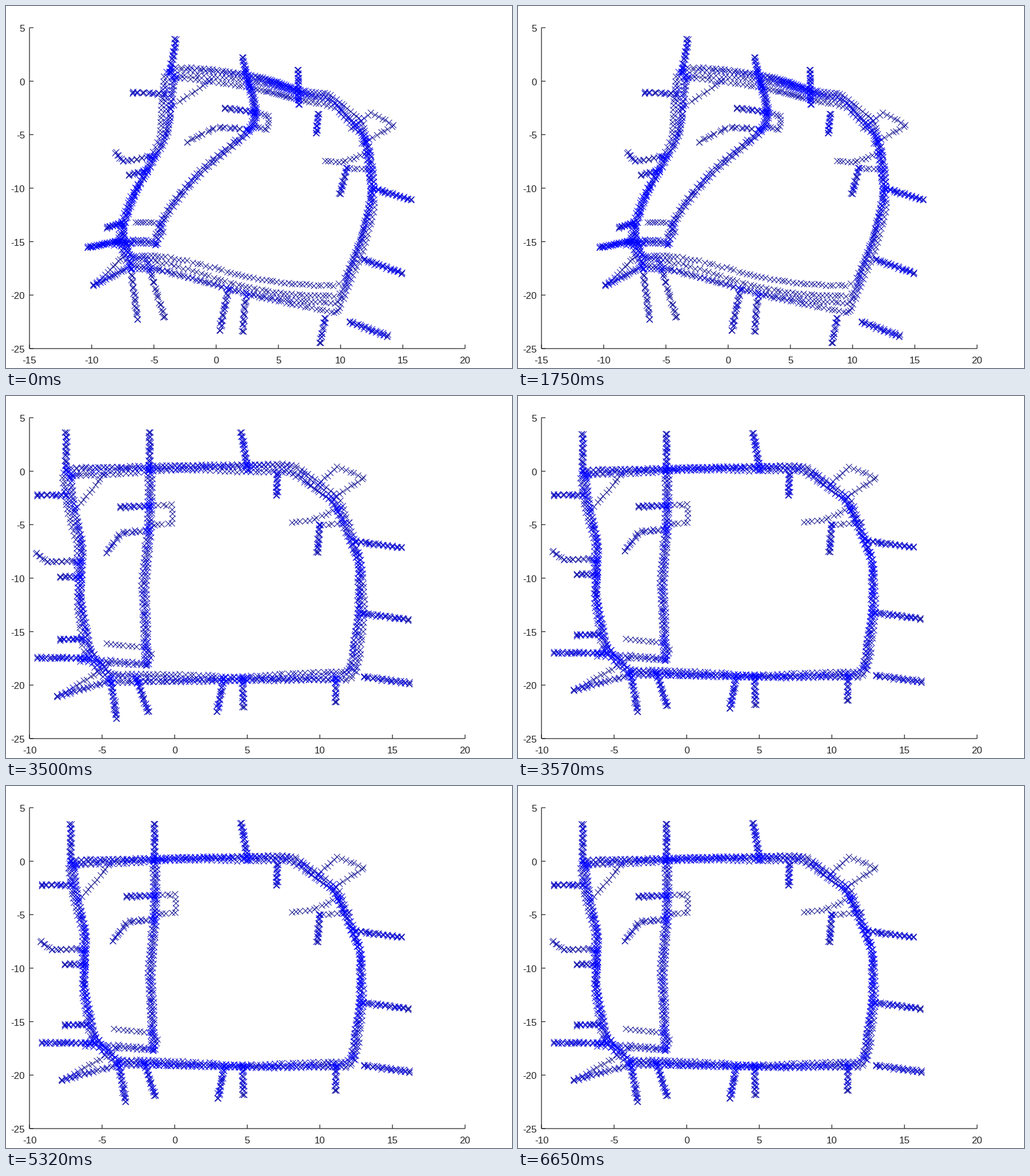
A matplotlib script that plays this animation: 884x634 px, repeating every 6.72 s.

```python
import numpy as np
import matplotlib.pyplot as plt
from matplotlib.animation import FuncAnimation

W, H, DPI = 884, 634, 100
LEFT, RIGHT, TOP, BOTTOM = 41, 802, 38, 600
FRAMES, INTERVAL, HOLD = 96, 70, 25
PX = 72 / DPI
INK = "#262626"
LAPS, STEP = 4, 7.8


def resample(path, step):
    p = np.array(path, float).reshape(-1, 2)
    d = np.r_[0, np.cumsum(np.hypot(*np.diff(p, axis=0).T))]
    s = np.linspace(0, d[-1], max(3, round(d[-1] / step) + 1))
    return np.c_[np.interp(s, d, p[:, 0]), np.interp(s, d, p[:, 1])]


def rounded(path, radius):
    """Close a path and soften its corners."""
    p = resample(path + path[:2], 1)
    k = np.ones(2 * radius + 1) / (2 * radius + 1)
    wrap = np.pad(p, ((radius, radius), (0, 0)), mode="wrap")
    return np.c_[np.convolve(wrap[:, 0], k, "valid"),
                 np.convolve(wrap[:, 1], k, "valid")]


class Survey:
    """Poses of a robot walking a floor plan, in stage pixels."""

    def __init__(self, spread):
        self.rng = np.random.default_rng(7)
        self.spread = spread
        self.rows = []

    def walk(self, path, n=1, w=0.0, lap=0.0, turns=0.0):
        """Follow a path n times on lanes that weave over +-w pixels."""
        for k in range(n):
            p = resample(path, STEP)
            t = np.gradient(p, axis=0)
            t /= np.maximum(np.hypot(*t.T), 1e-6)[:, None]
            m = len(p)
            lane = w * np.cos(np.pi * k / max(n - 1, 1) + turns * np.linspace(0, 6.28, m))
            side = lane + self.rng.normal(0, 0.6, m)
            along = self.rng.uniform(-2, 2, m)
            along[[0, -1]] = 0
            q = p + t * along[:, None] + np.c_[-t[:, 1], t[:, 0]] * side[:, None]
            self.rows.append(np.c_[q, np.full(m, lap * k / max(n - 1, 1))])

    def spur(self, x, y, dx, dy):
        """A dead end, walked in and out."""
        self.walk([x, y, x + dx, y + dy], 3, 1.3)

    def building(self):
        wall = [105, 133, 300, 129, 500, 126, 578, 182, 622, 290, 622, 380, 605, 490,
                400, 492, 180, 495, 142, 450, 125, 360, 128, 260, 114, 200]
        self.walk(rounded(wall, 14), LAPS, self.spread, lap=1, turns=2)
        self.walk([252, 130, 251, 225, 241, 330, 246, 470], 3, 4)
        self.walk([170, 138, 150, 165, 120, 200])

        for x, lean in (105, 0), (251, 0), (423, -12):
            self.spur(x, 130, lean, -66)
        for x, lean, drop in (183, 10, 70), (228, 20, 58), (380, -11, 58), (414, 1, 50), (576, 0, 41):
            self.spur(x, 495, lean, drop)
        for x, y, reach in (105, 174, 50), (130, 317, 35), (132, 426, 37), (145, 459, 90):
            self.spur(x, y, -reach, 0)
        for x, y in (612, 255), (624, 381), (626, 492):
            self.spur(x, y, 79, 11)
        self.spur(474, 138, -1, 36)
        self.spur(548, 226, -4, 48)
        self.spur(250, 193, -50, 1)

        # rooms and side passages
        self.walk([130, 290, 72, 290, 53, 276], 2, 1)
        self.walk([250, 192, 291, 192, 290, 223, 250, 228])
        self.walk([250, 235, 200, 241, 176, 275], 2, 1)
        self.walk([545, 155, 580, 124, 626, 144, 570, 180])
        self.walk([500, 222, 535, 218, 585, 195])
        self.walk([548, 227, 600, 222])
        self.walk([176, 434, 246, 441, 255, 452, 246, 472])
        self.walk([130, 462, 245, 470], 2, 2)
        self.walk([90, 527, 140, 497, 185, 465])
        self.walk([90, 527, 125, 515, 180, 500], 2, 1)
        return np.vstack(self.rows)


def settle(x, y, lap):
    """Final small pull of the left and lower parts."""
    side = np.clip((400 - x) / 150, 0, 1)
    core = 7 * y / 470 * np.exp(-((x - 205) / 50) ** 2)
    fade = np.clip((520 - x) / 300, 0.25, 1)
    return x + 8 * side + core, y + (5 - 0.03 * y) * fade


# where uncorrected odometry puts some landmarks: x, y, drifted x, drifted y
LANDMARKS = np.array([
    (105, 66, 296, 60), (251, 66, 414, 92), (423, 125, 512, 168), (474, 174, 543, 223),
    (626, 144, 678, 210), (545, 275, 584, 330), (691, 265, 708, 339), (703, 391, 692, 467),
    (706, 505, 667, 580), (576, 536, 549, 590), (415, 545, 414, 570), (248, 553, 276, 545),
    (90, 527, 153, 490), (54, 460, 142, 424), (95, 318, 215, 297), (56, 174, 223, 152),
    (176, 275, 317, 239), (252, 225, 432, 210), (246, 470, 262, 416)], float)


def drift(x, y, lap):
    """Thin-plate warp through the landmarks, then later laps ride higher."""
    src, dst = LANDMARKS[:, :2], LANDMARKS[:, 2:]

    def kernel(p):
        r2 = ((p[:, None] - src[None]) ** 2).sum(2)
        return r2 * np.log(r2 + 1e-9)

    def affine(p):
        return np.c_[np.ones(len(p)), p]

    a = affine(src)
    system = np.block([[kernel(src), a], [a.T, np.zeros((3, 3))]])
    coef = np.linalg.solve(system, np.vstack([dst, np.zeros((3, 2))]))
    p = np.c_[x, y]
    u, v = (np.c_[kernel(p), affine(p)] @ coef).T
    return u, v - lap * np.clip((u - 250) / 350, 0, 1) * (25 + 0.08 * v)


def keep(x, y, lap):
    return x, y


fig = plt.figure(figsize=(W / DPI, H / DPI), dpi=DPI, facecolor="white")
ax = fig.add_axes([0, 0, 1, 1])
ax.set(xlim=(0, W), ylim=(H, 0))
ax.axis("off")


def rule(xs, ys):
    return ax.plot(xs, ys, color=INK, lw=1.3 * PX, solid_capstyle="butt", snap=False)[0]


def label(x, y, value, ha):
    return ax.text(x, y, str(value), ha=ha, va="baseline", color=INK,
                   family="Liberation Sans", size=17 * PX)


def x_scale(lo):
    """Ticks and numbers every 5 units from lo to 20."""
    made = []
    for v in range(lo, 21, 5):
        x = LEFT + (v - lo) / (20 - lo) * (RIGHT - LEFT)
        made += [rule([x, x], [BOTTOM, BOTTOM - 7]), label(x, 626.5, v, "center")]
    return made


def crosses(x, y):
    """Navy where sparse, pure blue where poses crowd together."""
    near = np.hypot(x[:, None] - x, y[:, None] - y) < 9
    glow = np.clip((near.sum(1) - 2) / 9, 0, 1)
    rgb = np.c_[0.08 * (1 - glow), 0.08 * (1 - glow), 0.55 + 0.45 * glow]
    return ax.scatter(x, y, s=(10.5 * PX) ** 2, marker="x", c=rgb,
                      linewidths=1.0 * PX, zorder=3)


rule([LEFT, LEFT], [TOP, BOTTOM])
rule([LEFT, RIGHT], [BOTTOM, BOTTOM])
for v in range(-25, 6, 5):
    y = TOP + (5 - v) / 30 * (BOTTOM - TOP)
    rule([LEFT, LEFT + 7], [y, y])
    label(33, y + 7, v, "right")

stages = []
for spread, warp, lo in (8, drift, -15), (7.5, keep, -10), (5, settle, -10):
    poses = Survey(spread).building()
    stages.append([crosses(*warp(*poses.T)), *x_scale(lo)])


def update(i):
    now = min(max(i - 1, 0) // HOLD, len(stages) - 1)
    for k, group in enumerate(stages):
        for artist in group:
            artist.set_visible(k == now)
    return stages[now]


anim = FuncAnimation(fig, update, frames=FRAMES, interval=INTERVAL,
                     repeat=True, repeat_delay=0, blit=False)
plt.show()
```
